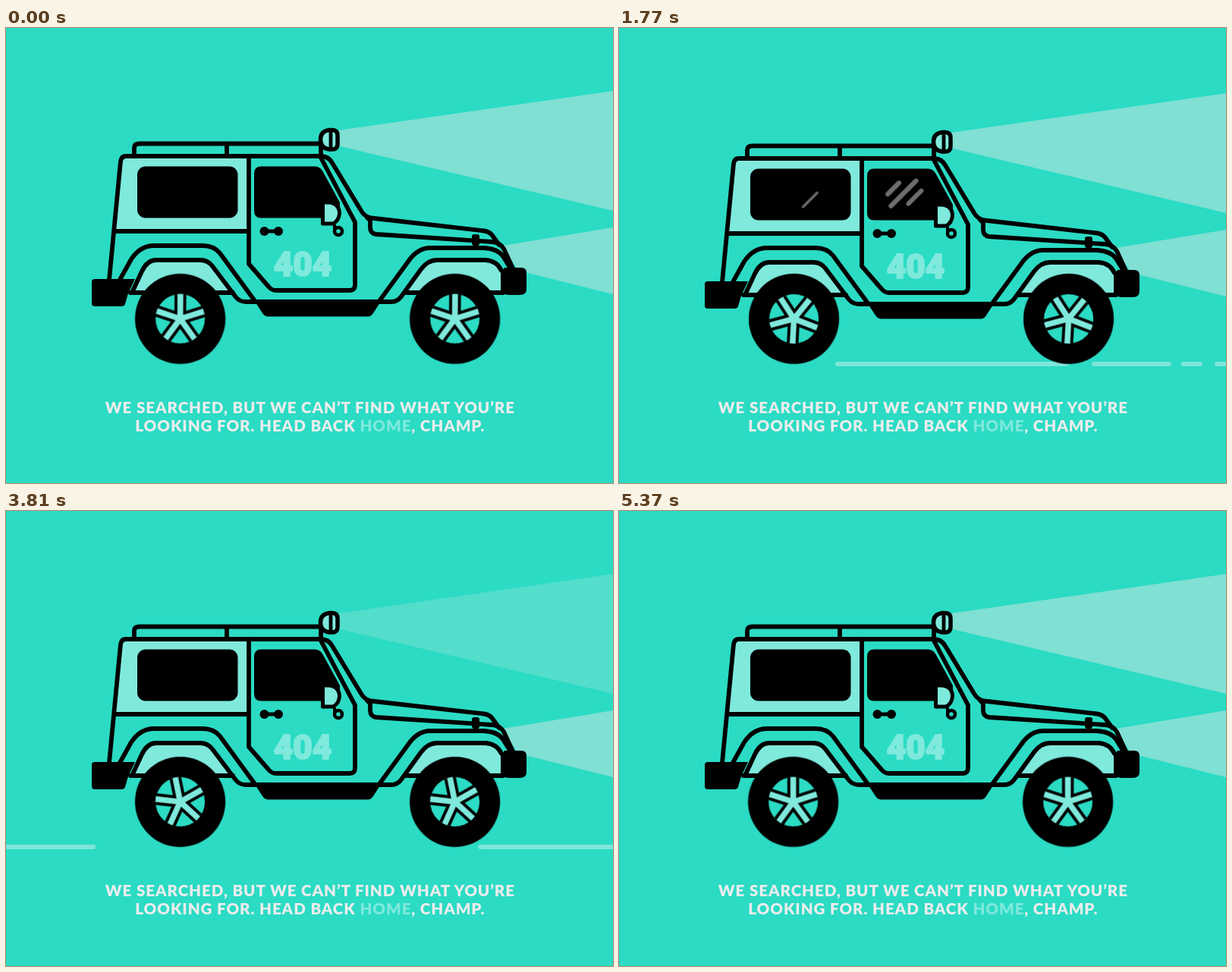
Recreate the animation shown at these times as an HTML page without scripts. Size 800x600 px, loop 5.4 s.

```html
<!DOCTYPE html>
<html lang="en">
<head>
<meta charset="utf-8">
<title>404</title>
<style>
  :root { --bg: #2bdbc4; --pale: #7fe9dc; --loop: 5400ms; }
  html, body { margin: 0; width: 100%; height: 100%; overflow: hidden; background: var(--bg); }
  svg { display: block; width: 800px; height: 600px; }

  .beam { fill: #e6e6e6; fill-opacity: .45; }
  .pale { fill: var(--pale); }
  .line { fill: none; stroke: #000; stroke-width: 5.8; stroke-linejoin: round; stroke-linecap: round; }
  .copy { font: 900 20.6px Lato, "Open Sans", sans-serif; letter-spacing: .9px; fill: #ececec; text-anchor: middle; }
  .plate {
    font: 900 44px Roboto, Inter, sans-serif; text-anchor: middle;
    fill: var(--pale); stroke: var(--pale); stroke-width: 2; stroke-linejoin: round;
  }

  /* Body tilts back when pulling away, dips over bumps */
  .body { transform-origin: 735px 350px; animation: body var(--loop) linear infinite; }
  @keyframes body {
    0%, 11.11% { transform: none; }
    14.44% { transform: translateY(0) rotate(-.92deg); }
    16.11% { transform: translateY(0) rotate(-1.6deg); }
    20.56%, 29.63% { transform: none; }
    32.78% { transform: translateY(3px) rotate(0deg); }
    37.04%, 53.33% { transform: none; }
    56.67% { transform: translateY(0) rotate(-1.6deg); }
    60.56% { transform: translateY(1.7px) rotate(-.3deg); }
    63.33%, 100% { transform: none; }
  }

  .axles { animation: axles var(--loop) linear infinite; }
  @keyframes axles {
    0%, 31.48% { transform: none; }
    32.78% { transform: translate(1px, 0); }
    34.63%, 58.33% { transform: none; }
    60.56% { transform: translate(1px, -3px); }
    62.96%, 100% { transform: none; }
  }

  .spin { transform-origin: 0 0; animation: spin var(--loop) linear infinite; }
  @keyframes spin {
    0% { transform: rotate(0deg); }
    99.44%, 100% { transform: rotate(2520deg); }
  }

  .flicker { animation: flicker var(--loop) linear infinite; }
  @keyframes flicker {
    0%, 12.78% { opacity: 1; }
    14.44% { opacity: .67; }
    15.56% { opacity: .4; }
    17.22%, 68.89% { opacity: 1; }
    70.56% { opacity: .47; }
    71.67%, 78.33% { opacity: 1; }
    79.44% { opacity: .5; }
    80.56%, 88.89% { opacity: 1; }
    90% { opacity: .5; }
    91.11%, 100% { opacity: 1; }
  }

  /* Road marks */
  .road { fill: #7fe5d8; }
  .road use { animation: pass var(--loop) linear var(--d, 0ms) infinite both; }
  .road .first { animation-name: first; }
  @keyframes pass {
    0% { transform: translateX(800px); }
    24.37%, 100% { transform: translateX(-680px); }
  }
  @keyframes first {
    0% { transform: translateX(804px); }
    18.43%, 100% { transform: translateX(-680px); }
  }

  /* Window glare: each bar opens from its lower edge, then the set fades */
  .glare { fill: #fff; fill-opacity: .43; animation: fade var(--loop) linear var(--d) infinite both; }
  .glare rect {
    transform-box: fill-box; transform-origin: 50% 100%;
    animation: wipe var(--loop) linear calc(var(--d) + var(--n) * 50ms) infinite both;
  }
  @keyframes wipe {
    0%, 30.19% { transform: scaleY(0); }
    30.74%, 42.59% { transform: scaleY(1); }
    42.6%, 81.67% { transform: scaleY(0); }
    82.22%, 91.67% { transform: scaleY(1); }
    91.68%, 100% { transform: scaleY(0); }
  }
  @keyframes fade {
    0%, 33.15% { opacity: 1; }
    34.9%, 45% { opacity: 0; }
    45.01%, 84.63% { opacity: 1; }
    86.39%, 95% { opacity: 0; }
    95.01%, 100% { opacity: 1; }
  }
</style>
</head>
<body>
<svg viewBox="0 0 800 600">
  <defs>
    <g id="marks">
      <rect y="440" width="308" height="6" rx="3"/>
      <rect x="338" y="440" width="105" height="6" rx="3"/>
      <rect x="456" y="440" width="28" height="6" rx="3"/>
      <rect x="500" y="440" width="177" height="6" rx="3"/>
    </g>
    <clipPath id="rim"><circle r="32.7"/></clipPath>
    <path id="spoke" d="M0 0V-32"/>
    <g id="star">
      <use href="#spoke"/>
      <use href="#spoke" transform="rotate(72)"/>
      <use href="#spoke" transform="rotate(144)"/>
      <use href="#spoke" transform="rotate(216)"/>
      <use href="#spoke" transform="rotate(288)"/>
    </g>
    <g id="wheel">
      <circle r="59.6"/>
      <g clip-path="url(#rim)">
        <circle r="32.7" fill="#2bdbc4"/>
        <use href="#star" stroke="#000" stroke-width="15.5"/>
        <use href="#star" stroke="#7fe9dc" stroke-width="7.6" stroke-linecap="round"/>
      </g>
    </g>
  </defs>

  <rect width="800" height="600" fill="#2bdbc4"/>

  <g class="road">
    <use href="#marks" class="first"/>
    <use href="#marks" style="--d:1313ms"/>
    <use href="#marks" style="--d:2603ms"/>
    <use href="#marks" style="--d:3653ms"/>
  </g>

  <g class="body">
    <path class="beam flicker" d="M436 135.3L830 78.7V248L436 155Z"/>
    <path class="beam" d="M652 287.5L830 258V358.5L676 320Z"/>

    <!-- panel and wheel arches -->
    <path class="pale" d="M152 170H319V268H140Z"/>
    <path class="pale" d="M166 349L179 321Q186 306 198 306H256Q266 306 272 314L299 349Z"/>
    <path class="pale" d="M526 349L547 318Q556 306 568 306H632Q647 307 653 320V349Z"/>

    <g class="line">
      <path d="M169 168V158Q169 152.5 176 152.5H415V170M291 152.5V168"/>
      <path d="M136 332L151 176Q152 169 158 169H415Q425 169 430 178L467.500 240Q472 248.500 481 250.500L630 267.500Q638 268.500 642 275L650 286"/>
      <path d="M476 250L480 254V263Q480 271 488 272L641 282Q651 283 656 291L668 317"/>
      <path d="M143 268H319"/>
      <path d="M320 170V311L346 341Q350 346 356 346H453Q460 346 460 339V256L415 171"/>
      <path d="M150 332L165 305Q177 287 195 287H259Q274 287 282 297L328 360"/>
      <path d="M166 349L179 321Q186 306 198 306H256Q266 306 272 314L303 355Q308 361 316 361H508Q516 361 521 354L547 318Q556 306 568 306H632Q647 307 653 320"/>
      <path d="M492 360L530 308Q542 290.500 558 290H630Q648 291 655 301L663 314"/>
      <path d="M164 349H299M528 349H655"/>
    </g>

    <!-- bumpers and sill -->
    <path d="M117 331H170L161 350L157 364Q156 367 152 367H117Q113 367 113 363V335Q113 331 117 331Z"/>
    <path d="M657 316H679Q686 316 686 323V344Q686 352 677 352H662Q653 351 652 346V323Z"/>
    <path d="M327 359H495L484 376Q481 380.500 477 380.500H346Q341 380.500 338 376Z"/>

    <!-- windows -->
    <rect x="173" y="182.500" width="132.500" height="68" rx="11"/>
    <path d="M336 182.500H407Q414 182.500 417.500 189L440 230V250.500H336Q327 250.500 327 241V192Q327 182.500 336 182.500Z"/>
    <g transform="translate(376.500 214.500) rotate(-45)">
      <g class="glare" style="--d:0ms">
        <rect style="--n:0" x="-9.500" y="10.400" width="30" height="6.200" rx="3"/>
        <rect style="--n:1" x="-28" y="-3.700" width="53" height="6.200" rx="3"/>
        <rect style="--n:2" x="-20" y="-17.800" width="27" height="6.200" rx="3"/>
      </g>
    </g>
    <g transform="translate(237.500 217) rotate(-45)">
      <g class="glare" style="--d:124ms">
        <rect style="--n:0" x="-9.500" y="10.400" width="30" height="6.200" rx="3"/>
        <rect style="--n:1" x="-28" y="-3.700" width="53" height="6.200" rx="3"/>
        <rect style="--n:2" x="-20" y="-17.800" width="27" height="6.200" rx="3"/>
      </g>
    </g>

    <!-- mirror, handle, latch -->
    <path class="pale" d="M417.500 230H425Q439 231 439.500 244Q439 254 431 258H417.500Z" stroke="#000" stroke-width="5" stroke-linejoin="round"/>
    <path d="M433 259V268" stroke="#000" stroke-width="4"/>
    <circle cx="438" cy="268" r="5" fill="none" stroke="#000" stroke-width="4.500"/>
    <path d="M340 268H359" stroke="#000" stroke-width="5"/>
    <circle cx="340.500" cy="268" r="6"/>
    <circle cx="359" cy="268" r="6"/>
    <rect x="614" y="272" width="10" height="15" rx="3"/>

    <!-- roof lamp -->
    <path class="pale" d="M426 134.500H430Q437 134.500 437 142V153Q437 160 430 160H426Q414.500 158.500 414.500 147Q414.500 136 426 134.500Z" stroke="#000" stroke-width="5.500"/>
    <path d="M428 134V160" stroke="#000" stroke-width="4.800"/>

    <text class="plate" x="391" y="327">404</text>
  </g>

  <g class="axles">
    <g transform="translate(229.600 383.500)"><use class="spin" href="#wheel"/></g>
    <g transform="translate(591.600 383.500)"><use class="spin" href="#wheel"/></g>
  </g>

  <text class="copy" x="400.800" y="507.500">WE SEARCHED, BUT WE CAN’T FIND WHAT YOU’RE</text>
  <text class="copy" x="400.800" y="531.500">LOOKING FOR. HEAD BACK <tspan fill="#7fe9dc">HOME</tspan>, CHAMP.</text>
</svg>
</body>
</html>
```
